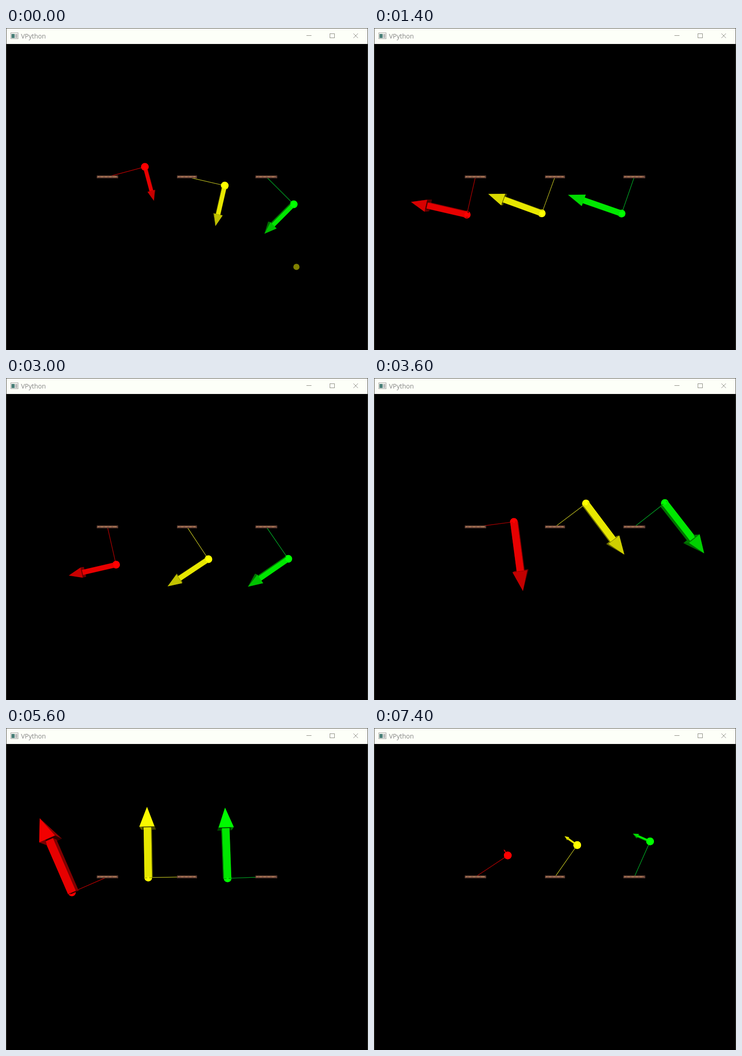
An HTML page with a canvas for the animation above (7.6 s loop, 794 by 705 pixels).

```html
<!DOCTYPE html>
<html lang="en">
<head>
<meta charset="utf-8">
<title>VPython</title>
<style>
  html, body { margin: 0; width: 100%; height: 100%; overflow: hidden; background: #000; }
  canvas { display: block; }
</style>
</head>
<body>
<canvas id="stage" width="794" height="705"></canvas>
<script>
const ctx = document.getElementById('stage').getContext('2d');
const STEP = 200, STEPS = 38;
const ROD = 85, BALL = 8.5, PIVOT_Y = 326;
const EYE = { x: 397, y: 370, distance: 690 };
const DEGREES_PER_PIXEL = 0.68; // swing per step for one pixel of velocity arrow

// Smooth curve through [step, degrees, arrow length] points; the arrow sets the slope.
function curve(keys) {
  return step => {
    let i = 0;
    while (i < keys.length - 2 && step >= keys[i + 1][0]) i++;
    const [start, a, arrowA] = keys[i], [end, b, arrowB] = keys[i + 1];
    const span = end - start, u = (step - start) / span, v = 1 - u;
    const m = arrowA * DEGREES_PER_PIXEL * span, n = arrowB * DEGREES_PER_PIXEL * span;
    return v * v * (a * (1 + 2 * u) + m * u) + u * u * (b * (1 + 2 * v) - n * v);
  };
}

// The middle pendulum swings up, falls back and goes over the top once per drive cycle.
const swing = curve([
  [0, 77, -91], [4, -133, -139], [7, -380, -125], [10, -320, 126],
  [13, -222, -40], [18, -593, -140], [19, -708, -165], [22, -694, 81],
  [25, -575, 0], [28, -809, -155], [32, -1110, -120], [37, -935, 34]
]);
// The left one wanders around it, the right one joins it and drifts off at the end.
const wander = curve([
  [0, 28, 14], [4, 16, -13], [10, -7, -18], [18, -29.5, -13],
  [22, 2, 25], [28, 22.5, -22], [37, -21.5, -18]
]);
const drift = step => 1 - 33 * Math.exp(-((step / 3.1) ** 2)) + 10 * Math.exp((step - 37) / 2);

const pendulums = [
  { x: 222.5, beam: [199, 246], color: [255, 0, 0], rod: '#a80000', angle: t => swing(t) + wander(t) },
  { x: 397, beam: [375, 419], color: [255, 255, 0], rod: '#a8a81c', angle: swing },
  { x: 571, beam: [547, 595], color: [0, 255, 0], rod: '#009a22', angle: t => swing(t) + drift(t) }
];

function shade(color, nx, ny, nz) {
  const key = Math.max(0, 0.22 * nx - 0.44 * ny + 0.88 * nz);
  const fill = Math.max(0, -0.88 * nx + 0.22 * ny - 0.44 * nz);
  const light = Math.min(1, 0.2 + 0.8 * key + 0.3 * fill);
  return `rgb(${color.map(c => Math.round(c * light))})`;
}

function polygon(points, fill) {
  ctx.fillStyle = fill;
  ctx.beginPath();
  for (const [x, y] of points) ctx.lineTo(x, y);
  ctx.closePath();
  ctx.fill();
}

function disc(x, y, radius, fill) {
  ctx.fillStyle = fill;
  ctx.beginPath();
  ctx.arc(x, y, radius, 0, 2 * Math.PI);
  ctx.fill();
}

function line(x1, y1, x2, y2, color, width = 1) {
  ctx.strokeStyle = color;
  ctx.lineWidth = width;
  ctx.beginPath();
  ctx.moveTo(x1, y1);
  ctx.lineTo(x2, y2);
  ctx.stroke();
}

// A square shaft with a pyramid head, seen in perspective.
function drawArrow(x, y, dx, dy, length, color) {
  const half = length * 0.053, headHalf = length * 0.106, neck = length * 0.71;
  const point = (along, across, z) => {
    const scale = EYE.distance / (EYE.distance - z);
    return [
      EYE.x + (x + dx * along - dy * across - EYE.x) * scale,
      EYE.y + (y + dy * along + dx * across - EYE.y) * scale
    ];
  };
  // The shaft's front face lies in the picture plane.
  const square = (along, h) => {
    const front = h - half, back = -h - half;
    return [point(along, -h, front), point(along, h, front), point(along, h, back), point(along, -h, back)];
  };
  const start = square(0, half), end = square(neck, half);
  const base = square(neck, headHalf), tip = point(length, 0, 0);
  const tilt = 0.316, lean = 0.949;

  polygon(base, shade(color, -dx, -dy, 0));
  polygon(start, shade(color, -dx, -dy, 0));
  for (const [side, front, back] of [[-1, 0, 3], [1, 1, 2]]) {
    polygon([start[front], end[front], end[back], start[back]], shade(color, -dy * side, dx * side, 0));
  }
  polygon([start[0], end[0], end[1], start[1]], shade(color, 0, 0, 1));
  for (const [side, front, back] of [[-1, 0, 3], [1, 1, 2]]) {
    const nx = -dy * side * lean + dx * tilt, ny = dx * side * lean + dy * tilt;
    polygon([base[front], base[back], tip], shade(color, nx, ny, 0));
  }
  polygon([base[0], base[1], tip], shade(color, dx * tilt, dy * tilt, lean));
}

function drawBeam([left, right]) {
  ctx.fillStyle = '#5e3c32';
  ctx.fillRect(left, 323, right - left, 6);
  ctx.fillStyle = '#a07050';
  ctx.fillRect(left + 2, 324, right - left - 5, 3);
  ctx.fillStyle = '#84584a';
  for (let x = left + 5; x < right - 6; x += 9) ctx.fillRect(x, 325, 4, 2);
}

function drawPendulum({ x: pivotX, beam, color, rod, angle }, step) {
  const theta = angle(step) * Math.PI / 180;
  const h = 0.001;
  const arrow = (angle(step + h) - angle(step - h)) / (2 * h) / DEGREES_PER_PIXEL;
  const sign = Math.sign(arrow), length = Math.abs(arrow);
  const x = pivotX + ROD * Math.sin(theta), y = PIVOT_Y + ROD * Math.cos(theta);
  const fill = `rgb(${color})`;
  line(pivotX, PIVOT_Y, x, y, rod, 1.4);
  disc(x, y, BALL, fill);
  drawArrow(x, y, sign * Math.cos(theta), -sign * Math.sin(theta), length, color);
  // The cap of the ball that stands out of the shaft's front face.
  disc(x, y, Math.sqrt(Math.max(0, BALL ** 2 - (length * 0.053) ** 2)), fill);
  drawBeam(beam);
}

function drawPointer(step) {
  if (step > 4) return;
  const x = 637 - 7.25 * step, y = 523 + 6.75 * step;
  disc(x, y, 6.8, '#808000');
  if (step === 0) return;
  const outline = [[0, 0], [0, 14], [3, 11], [6, 18], [8, 17], [5, 10], [9, 10]];
  polygon(outline.map(([px, py]) => [x + 10 + px, y + 8 + py]), '#d8d8ec');
}

function drawWindow() {
  ctx.fillStyle = '#000';
  ctx.fillRect(0, 0, 794, 705);
  ctx.fillStyle = '#fdfff8';
  ctx.fillRect(0, 0, 794, 35);
  ctx.lineWidth = 1;
  ctx.strokeStyle = '#44443c';
  ctx.strokeRect(0.5, 0.5, 793, 705);

  ctx.strokeStyle = '#999';
  ctx.strokeRect(10.5, 10.5, 16, 13);
  ctx.fillStyle = '#4a7f78';
  ctx.fillRect(12, 13, 7, 9);
  ctx.fillStyle = '#bbb';
  ctx.fillRect(20, 13, 5, 9);

  ctx.fillStyle = '#858585';
  ctx.font = '14px "Open Sans", sans-serif';
  ctx.fillText('VPython', 33, 22.5);

  const gray = '#85857c';
  line(659, 16.5, 670, 16.5, gray);
  ctx.strokeRect(710.5, 12.5, 10, 9);
  line(762, 12, 772, 22, gray);
  line(772, 12, 762, 22, gray);
}

function draw(now) {
  const step = Math.floor(now / STEP) % STEPS;
  drawWindow();
  for (const pendulum of pendulums) drawPendulum(pendulum, step);
  drawPointer(step);
  requestAnimationFrame(draw);
}
requestAnimationFrame(draw);
</script>
</body>
</html>
```
